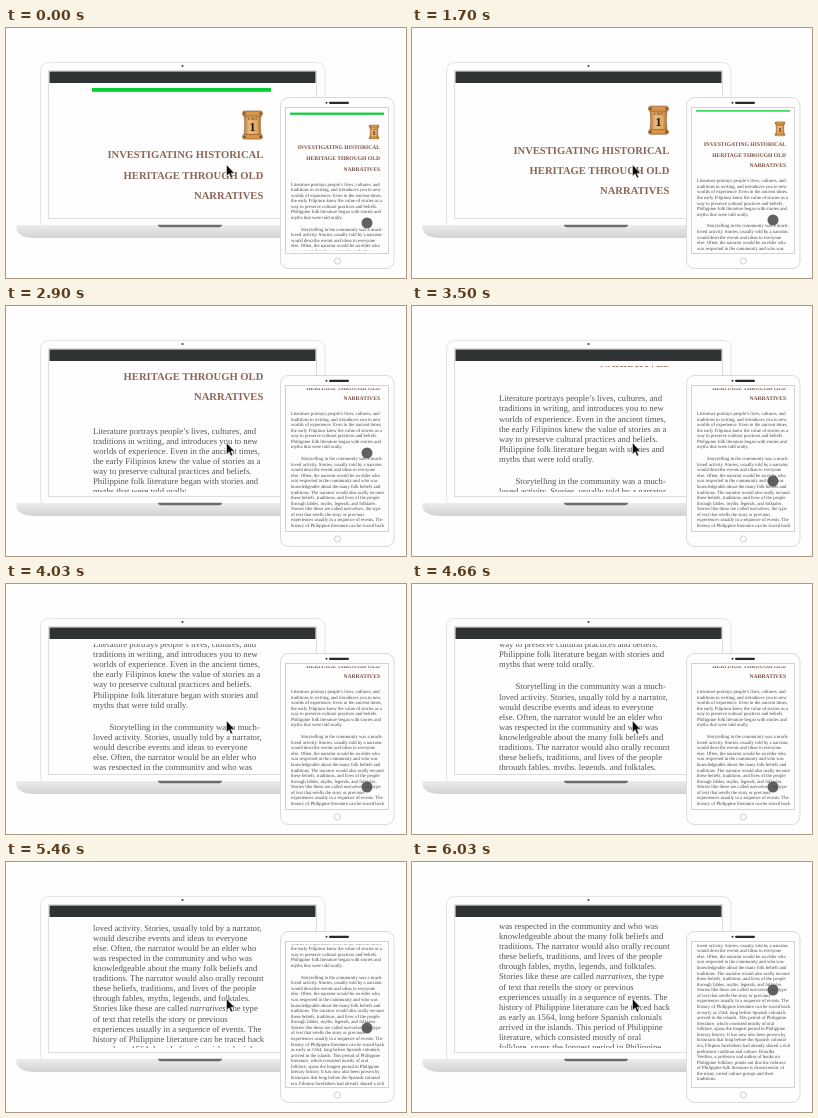
An HTML page that plays this animation: 400x250 px, repeating every 7.36 s.

```html
<!DOCTYPE html>
<html lang="en">
<head>
<meta charset="utf-8">
<title>Synced reading on two devices</title>
<style>
  html, body { margin: 0; width: 100%; height: 100%; overflow: hidden; background: #fefefe; }
  svg { display: block; width: 100%; height: 100%; }
  text { font-family: "Liberation Serif", serif; text-rendering: geometricPrecision; white-space: pre; }
  .title { font-weight: bold; text-anchor: end; }
</style>
</head>
<body>
<svg viewBox="0 0 400 250">
  <defs>
    <linearGradient id="metal" x2="0" y2="1">
      <stop offset="0" stop-color="#ececec"/>
      <stop offset=".4" stop-color="#e2e2e2"/>
      <stop offset="1" stop-color="#d2d2d2"/>
    </linearGradient>
    <linearGradient id="paper">
      <stop offset="0" stop-color="#b87a3a"/>
      <stop offset=".3" stop-color="#e8b878"/>
      <stop offset=".75" stop-color="#e2a961"/>
      <stop offset="1" stop-color="#a9692e"/>
    </linearGradient>
    <g id="scroll">
      <path d="M-8.5-11H8.500Q7 0 8.500 11H-8.500Q-7 0-8.500-11Z" fill="url(#paper)" stroke="#9a6230" stroke-width=".6"/>
      <rect x="-10" y="-14" width="20" height="5" rx="2.200" fill="#d9964a" stroke="#8a5526" stroke-width=".7"/>
      <rect x="-10" y="9.500" width="20" height="4.500" rx="2.200" fill="#d9964a" stroke="#8a5526" stroke-width=".7"/>
      <path d="M-9-11.500h2M7-11.500h2M-9 11.800h2M7 11.800h2" stroke="#6e3f1c" stroke-width="2"/>
      <text y="-5" font-size="4" font-weight="bold" text-anchor="middle" fill="#6b3d20">UNIT</text>
      <text y="5.500" font-size="12" font-weight="bold" text-anchor="middle" fill="#1c130c">1</text>
    </g>
    <clipPath id="laptopClip"><path d="M44 60H309V186H44Z"/></clipPath>
    <clipPath id="phoneClip"><path d="M280 82.300H382V223H280Z"/></clipPath>
  </defs>

  <rect x="34.500" y="34.500" width="284.500" height="166" rx="8" fill="#fefefe" stroke="#e4e4e4"/>
  <circle cx="176.500" cy="38" r="1.100" fill="#444"/>
  <rect x="42.500" y="42.500" width="268" height="148" fill="#fefefe" stroke="#dcdcdc"/>
  <rect x="43.500" y="43.500" width="266" height="11.500" fill="#303334"/>
  <path d="M10.500 197H343V202Q341 209 328 210H27Q13 209 10.500 202Z" fill="url(#metal)"/>
  <path d="M152 196.800H216Q216 199.200 213 199.200H155Q152 199.200 152 196.800Z" fill="#6c6c6e"/>
  <g clip-path="url(#laptopClip)"><g id="laptop"></g></g>
  <path d="M220.500 136.800V148.200L223.100 145.800L224.900 150L226.700 149.200L224.900 145.200H228.500Z" fill="#0c0c0c" stroke="#fff" stroke-width=".5"/>

  <rect x="274.500" y="69.500" width="113.500" height="171" rx="8" fill="#fefefe" stroke="#d9d9d9"/>
  <rect x="279.500" y="79.500" width="103" height="146" fill="#fefefe" stroke="#d2d2d2"/>
  <circle cx="320.500" cy="74.800" r="1" fill="#333"/>
  <rect x="323" y="73.700" width="20" height="2.200" rx="1.100" fill="#2a2a2a"/>
  <circle cx="331.300" cy="233" r="3.100" fill="#fefefe" stroke="#c4c4c4" stroke-width=".8"/>
  <g clip-path="url(#phoneClip)"><g id="phone"></g></g>
  <circle id="touch" cx="361" r="5.500" fill="#484848" fill-opacity=".86"/>
</svg>
<script>
const LOOP = 7360;
const title = ["INVESTIGATING HISTORICAL", "HERITAGE THROUGH OLD", "NARRATIVES"];
const paragraphs = [`Literature portrays people’s lives, cultures, and
traditions in writing, and introduces you to new
worlds of experience. Even in the ancient times,
the early Filipinos knew the value of stories as a
way to preserve cultural practices and beliefs.
Philippine folk literature began with stories and
myths that were told orally.`,
`Storytelling in the community was a much-
loved activity. Stories, usually told by a narrator,
would describe events and ideas to everyone
else. Often, the narrator would be an elder who
was respected in the community and who was
knowledgeable about the many folk beliefs and
traditions. The narrator would also orally recount
these beliefs, traditions, and lives of the people
through fables, myths, legends, and folktales.
Stories like these are called <tspan font-style="italic">narratives</tspan>, the type
of text that retells the story or previous
experiences usually in a sequence of events. The
history of Philippine literature can be traced back
as early as 1564, long before Spanish colonials
arrived in the islands. This period of Philippine
literature, which consisted mostly of oral
folklore, spans the longest period in Philippine
literary history. It has now also been proven by
historians that long before the Spanish colonial
era, Filipino forefathers had already shared a rich
prehistoric tradition and culture. Rosalba
Verdino, a professor and author of books on
Philippine folklore, points out that the richness
of Philippine folk literature is characteristic of
the many varied culture groups and their
traditions.`].map(p => p.split("\n"));

const $ = id => document.getElementById(id);
const line = (x, y, size, fill, text, cls = "") =>
  `<text class="${cls}" x="${x}" y="${y}" font-size="${size}" fill="${fill}">${text}</text>`;

function page(o) {
  const [bx, by, bw, bh] = o.bar, [ix, iy, scale] = o.icon;
  let out = `<rect x="${bx}" y="${by}" width="${bw}" height="${bh}" fill="#06cf33"/>
    <use href="#scroll" transform="translate(${ix} ${iy}) scale(${scale})"/>`;
  title.forEach((text, i) => {
    out += line(o.right, o.titleY + i * o.titleGap, o.titleSize, o.titleColor, text, "title");
  });
  paragraphs.forEach((lines, p) => lines.forEach((text, i) => {
    const x = o.left + (p && !i ? o.indent : 0);
    out += line(x, o.bodyY[p] + i * o.gap, o.size, o.color, text);
  }));
  return out;
}

$("laptop").innerHTML = page({
  bar: [86, 60, 179, 3.8], icon: [246.5, 97, 1],
  right: 257.3, titleY: 130.4, titleGap: 20.1, titleSize: 10.6, titleColor: "#8b6656",
  left: 87, indent: 16.5, bodyY: [204.7, 287.4], gap: 10.12, size: 8.68, color: "#555"
});
$("phone").innerHTML = page({
  bar: [284, 84.6, 94, 2.2], icon: [368, 104, .5],
  right: 374, titleY: 121.4, titleGap: 10.6, titleSize: 5.6, titleColor: "#7d5044",
  left: 285, indent: 10, bodyY: [157.5, 202.7], gap: 5.57, size: 4.74, color: "#444"
});

// Gaps between picture changes, in thirtieths of a second.
const gaps = "2323232322" + "2323232323" + "2232232233" + "22222222323" + "2232322322" + "2323";
let ticks = 0;
const changes = [1700, ...[...gaps].map(g => 1700 + 10 * Math.floor((ticks += +g) * 10 / 3))];

// Keys pair a step count with a value.
const laptopKeys = [[0, 0], [1, 4.8], [16, 77], [30, 141.7], [39, 182], [49, 229], [56, 261]];
const phoneKeys = [[0, 0], [1, 3.2], [16, 48.5], [41, 48.5], [49, 86], [56, 123.5]];
const touchKeys = [[0, 195], [16, 147], [30, 203], [41, 203], [49, 166], [56, 128]];

function at(keys, n) {
  const i = Math.max(1, keys.findIndex(k => k[0] >= n));
  const [n0, v0] = keys[i - 1], [n1, v1] = keys[i];
  return v0 + (v1 - v0) * (n - n0) / (n1 - n0);
}

function draw(now) {
  const t = now % LOOP;
  const step = changes.filter(c => c <= t).length;
  $("laptop").setAttribute("transform", `translate(0 ${-at(laptopKeys, step)})`);
  $("phone").setAttribute("transform", `translate(0 ${-at(phoneKeys, step)})`);
  $("touch").setAttribute("cy", at(touchKeys, step));
}

const start = performance.now();
function tick() {
  draw(performance.now() - start);
  requestAnimationFrame(tick);
}
tick();
</script>
</body>
</html>
```
